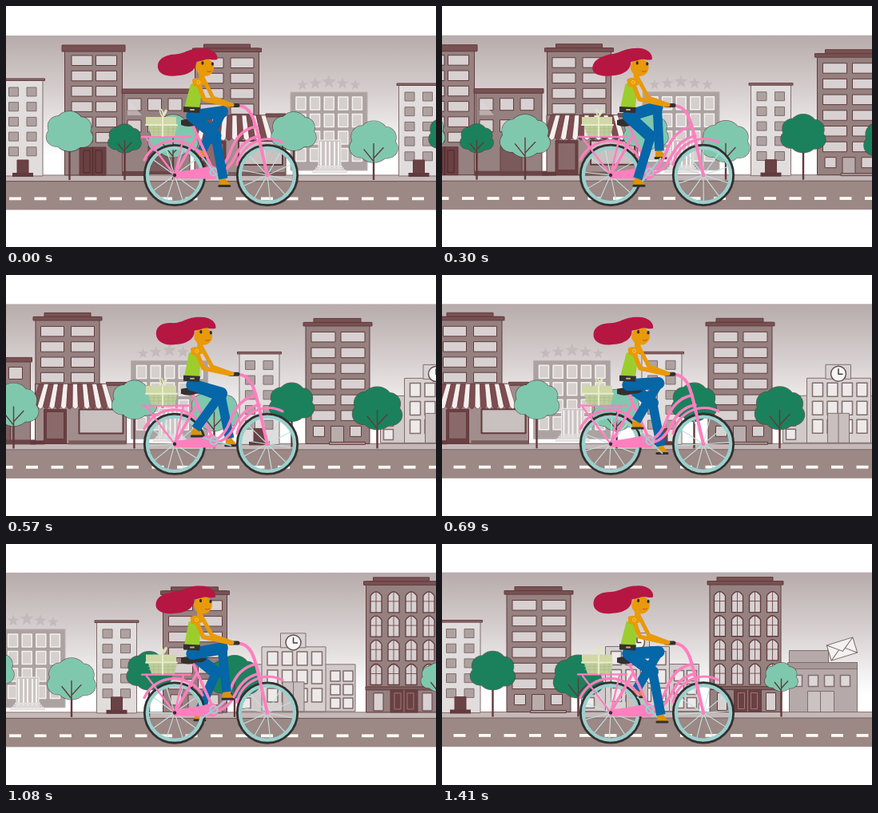
Recreate the animation shown at these times as an HTML page with a canvas. Size 538 by 302 pixels, loop 1.44 s.

```html
<!DOCTYPE html>
<html lang="en">
<head>
<meta charset="utf-8">
<style>
html, body { margin: 0; width: 100%; height: 100%; overflow: hidden; background: #fff; }
canvas { display: block; width: 538px; height: 302px; }
</style>
</head>
<body>
<canvas id="stage" width="538" height="302"></canvas>
<script>
const ctx = document.getElementById('stage').getContext('2d');
const LOOP = 1440, STEP = 30, SPEED = 0.35, TAU = Math.PI * 2;
const INK = '#633a3d', WALL = '#958180', ROOF = '#785153', GLASS = '#d8d1d1', PALE = '#e2dddd', GREY = '#7f6e6e';
const TEAL = '#7fc8ae', GREEN = '#1a815c', PINK = '#ff7fbe', SKIN = '#e89a0a', JEANS = '#0566a8', DARK = '#33302f', RIM = '#9bd0cd';

function rect(x, y, w, h, fill, line, width = 1) {
  if (fill) { ctx.fillStyle = fill; ctx.fillRect(x, y, w, h); }
  if (line) { ctx.strokeStyle = line; ctx.lineWidth = width; ctx.strokeRect(x, y, w, h); }
}
function path(d, fill, line, width = 1) {
  const p = d instanceof Path2D ? d : new Path2D(d);
  if (fill) { ctx.fillStyle = fill; ctx.fill(p); }
  if (line) { ctx.strokeStyle = line; ctx.lineWidth = width; ctx.stroke(p); }
}
function oval(x, y, rx, ry, fill, line, width) {
  const p = new Path2D();
  p.ellipse(x, y, rx, ry, 0, 0, TAU);
  path(p, fill, line, width);
}
function grid(x, y, cols, rows, dx, dy, draw) {
  for (let r = 0; r < rows; r++) for (let c = 0; c < cols; c++) draw(x + c * dx, y + r * dy);
}
const pane = (w, h, fill = GLASS, line = INK, width = 1) => (x, y) => rect(x, y, w, h, fill, line, width);

// Buildings

function block(x, y, w, capX, capW) {
  rect(x + 3, y, w - 6, 212 - y, WALL, INK);
  rect(x + capX, y - 5, capW, 5, ROOF, INK);
  rect(x, y, w, 4.5, ROOF, INK);
}
function whiteHouse(x, y) {
  rect(x, y, 50, 213 - y, PALE, GREY);
  rect(x - 2.5, y - 2, 55, 2.5, '#8d6d6e', INK);
  grid(x + 7.5, y + 9, 2, 5, 22.5, 18.7, pane(12, 11, '#aea2a1', GREY));
  rect(x + 18, 193, 14, 18, '#6a4245', INK);
  rect(x + 12, 209, 26, 5, INK);
}
function brownOne() {
  rect(73.5, 56, 72, 156, WALL, INK);
  rect(70, 49, 79, 8, ROOF, INK);
  grid(82, 62, 2, 6, 30.5, 19.3, pane(26, 12.5));
  rect(92, 177, 33, 35, '#6a4043', INK);
  path('M108.5 177V212M97 181h8v28h-8zM112 181h8v28h-8z', null, '#4e282c');
}
function brownLow() {
  rect(147, 109, 83, 103, WALL, INK);
  rect(145, 104, 87, 5.5, ROOF, INK);
  grid(152, 116, 3, 2, 25.5, 27, pane(17, 15));
  path('M152 116L170 137H152Z', 'rgba(225,218,218,.5)');
  rect(178, 176, 27, 36, '#7b5a5b', INK);
  rect(145, 207, 92, 6, '#6a4547');
}
function shop() {
  block(233.5, 53, 86, 14, 58);
  grid(243, 65, 2, 4, 38, 19.3, pane(29, 12.5));
  rect(236, 137, 114, 75, '#a18e8c', INK);
  rect(325, 135, 25, 4, ROOF, INK);
  rect(247, 169, 28, 43, '#6a4043', INK);
  rect(250, 172, 22, 34, '#8a696b', INK);
  rect(291, 169, 55, 30, '#c9c0c0', INK, 2);
  for (let i = 0; i < 14; i++) {
    const top = 241 + i * 6, bottom = 231.5 + i * 7.3;
    path(`M${top} 137h6L${bottom + 7.3} 165q-3.6 7-7.3 0Z`, i % 2 ? '#f4efed' : '#7c4d51', INK, .6);
  }
  rect(230, 208, 18, 5, INK);
  rect(278, 208, 72, 5, '#7a5c5c');
}
function star(x, y, r) {
  let d = '';
  for (let i = 0; i < 10; i++) {
    const a = i * TAU / 10 - TAU / 4, s = i % 2 ? r * 0.42 : r;
    d += `${i ? 'L' : 'M'}${x + s * Math.cos(a)} ${y + s * Math.sin(a)}`;
  }
  path(d + 'Z', '#c3baba');
}
function hotel() {
  rect(356, 108, 96, 98, '#aca2a1', '#b9b0af');
  grid(363, 114, 5, 4, 17.6, 21.5, pane(12, 16, '#d5cfce', '#f4f1f0', 1.5));
  rect(391, 168, 28, 38, '#cbc4c3', '#f0edec');
  path('M394 170v34M400 170v34M405 170v34M411 170v34M416 170v34', null, '#f5f3f2', 2);
  for (let i = 0; i < 4; i++) rect(389 - i * 2, 200 + i * 2.5, 32 + i * 4, 2, '#e2dedd');
  [371, 387, 404, 421, 437].forEach((x, i) => star(x, 95 + Math.abs(i - 2) * 2, 9 - Math.abs(i - 2)));
}
function brownThree() {
  block(571.5, 60, 86, 13, 59);
  grid(581.5, 72, 2, 6, 37, 19.7, pane(30, 12.5));
  grid(584, 190, 2, 1, 46, 0, pane(14, 13));
  rect(606, 190, 16, 22, '#b8adac', INK);
  rect(604, 210, 45, 3, '#a79897', INK);
}
function school() {
  const small = pane(12, 13, '#eeeaea', GREY, 1.5);
  rect(668, 152, 147, 59, '#d2caca', GREY);
  grid(672, 160, 1, 3, 17, 17, small);
  grid(784, 160, 2, 3, 16, 17, small);
  rect(698, 130, 80, 81, '#d8d1d0', GREY);
  rect(721.5, 113, 31.5, 18, '#d8d1d0', GREY);
  grid(705, 136, 4, 3, 18.5, 23, pane(13, 17, '#eeeaea', GREY, 1.5));
  rect(724, 174, 27, 37, '#c8bfbe', GREY);
  path('M737.5 174V211', null, GREY);
  oval(737.5, 124.5, 9.5, 9.5, '#f7f5f5', '#625555', 1.5);
  path('M737.5 118V125H743', null, '#4b3c3d', 1.5);
}
function archHouse() {
  block(825.5, 48, 95, 12, 70);
  grid(834, 61, 4, 4, 22, 30.2, (x, y) => {
    path(`M${x} ${y + 26}V${y + 5}q7-10 14 0V${y + 26}Z`, GLASS, INK, 1.3);
    path(`M${x + 7} ${y}V${y + 26}M${x} ${y + 12}h14`, null, INK, .8);
  });
  rect(828, 180, 90, 4, '#785e5d', INK);
  rect(859, 184, 34, 28, '#6a4043', INK);
  path('M876 184V212M864 188h8v20h-8zM880 188h8v20h-8z', null, '#9a7b7b');
  grid(838, 188, 2, 1, 61, 0, pane(12, 22));
}
function postOffice() {
  rect(928, 135, 49, 18, '#b5aaa9', GREY);
  rect(928, 150, 85, 62, '#b5aaa9', GREY);
  rect(926, 150, 87, 8, '#a69998', GREY);
  grid(932, 166, 4, 1, 20, 0, pane(12, 14, '#ddd8d7', GREY, 1.5));
  rect(951, 186, 33, 26, '#cbc3c2', GREY);
  path('M967 186V212', null, GREY);
  ctx.save();
  ctx.translate(994, 133);
  ctx.rotate(-0.3);
  rect(-17, -10, 34, 20, '#f4f2f1', '#77696a');
  path('M-17 -10L0 3L17 -10M-17 10L-4 0M17 10L4 0', null, '#77696a');
  ctx.restore();
}

function tree(x, y, r, color, branched) {
  const s = r / 28, crown = new Path2D();
  [[0, -10, 17, 15], [-14, -6, 13, 13], [14, -5, 13, 13], [-16, 7, 13, 12], [16, 8, 13, 12], [0, 10, 18, 15]]
    .forEach(([dx, dy, rx, ry]) => {
      crown.moveTo(x + (dx + rx) * s, y + dy * s);
      crown.ellipse(x + dx * s, y + dy * s, rx * s, ry * s, 0, 0, TAU);
    });
  path(`M${x} ${y + 10}V218`, null, INK, 2.4);
  path(crown, null, 'rgba(70,50,50,.7)', 1.4);
  path(crown, color);
  if (!branched) return;
  path(`M${x} ${y + 42 * s}V${y + 2}M${x} ${y + 24 * s}L${x - 12 * s} ${y + 9 * s}M${x} ${y + 20 * s}L${x + 12 * s} ${y + 7 * s}`, null, INK, 1.4);
}

const sky = ctx.createLinearGradient(0, 37, 0, 205);
sky.addColorStop(0, '#b7abab');
sky.addColorStop(.45, '#d9d2d2');
sky.addColorStop(.9, '#fff');

function street(t) {
  ctx.save();
  ctx.translate(0, -1.5 * t / LOOP);
  rect(0, 37, 538, 218.5, sky);
  rect(0, 212, 538, 8, '#c5b9b8');
  rect(0, 220, 538, 35.5, '#9c8885');
  rect(0, 211.5, 538, 1, '#8a7574');
  rect(0, 219, 538, 1.2, '#745c5c');
  ctx.translate(-SPEED * t, 0);
  for (let x = 4; x < 1060; x += SPEED * LOOP / 16) rect(x, 239.5, 15, 3.8, '#fbfaf4');
  whiteHouse(-4, 93);
  brownOne();
  brownLow();
  shop();
  hotel();
  whiteHouse(491.5, 99);
  brownThree();
  school();
  archHouse();
  postOffice();
  tree(79.5, 157, 28, TEAL);
  tree(148.5, 166, 20, GREEN, true);
  tree(209, 163, 30, TEAL, true);
  tree(360, 157, 27, TEAL);
  tree(460, 170, 29, TEAL, true);
  tree(557, 160, 27, GREEN);
  tree(664, 167.5, 30, GREEN, true);
  tree(918, 168, 20, TEAL, true);
  ctx.restore();
}

// Bicycle and rider

function wheel(x, turn) {
  for (let i = 0; i < 10; i++) {
    const a = turn + i * TAU / 10;
    path(`M${x} 212L${x + 34 * Math.cos(a)} ${212 + 34 * Math.sin(a)}`, null, '#c2e2e0', 1.1);
  }
  oval(x, 212, 34.5, 34.5, null, RIM, 5);
  oval(x, 212, 37.7, 37.7, null, DARK, 2.8);
}
function leg(angle) {
  const px = 259.5 + 22 * Math.cos(angle), py = 208 + 22 * Math.sin(angle);
  const hip = [233, 138], ankle = [px - 1, py - 9];
  const thigh = 38, shin = 55, dx = ankle[0] - hip[0], dy = ankle[1] - hip[1];
  const reach = Math.min(Math.hypot(dx, dy), thigh + shin);
  const lift = Math.acos((thigh ** 2 + reach ** 2 - shin ** 2) / (2 * thigh * reach));
  const a = Math.atan2(dy, dx) - lift;
  const knee = [hip[0] + thigh * Math.cos(a), hip[1] + thigh * Math.sin(a)];
  path(`M${ankle}L${px - 1} ${py - 3}`, null, SKIN, 7);
  path(`M${px - 6} ${py - 8}h8q5 4 5 7h-13z`, '#de9206');
  path(`M${px - 6} ${py}h13`, null, DARK, 3);
  path(`M${hip}L${knee}`, null, JEANS, 15);
  ctx.lineCap = 'butt';
  path(`M${knee}L${ankle}`, null, JEANS, 11.5);
  ctx.lineCap = 'round';
}
function basket() {
  path('M175 139h38v11h-38z', '#cfd8a6');
  path('M178 150h36l-3 13h-29z', '#bfcd9b');
  path('M178 154h34M179 158h33M185 150v12M191 150v12M203 150v12M209 150v12', null, '#adbd8b', .7);
  path('M196 139v24M175 149h39', null, '#e8edcb', 2);
  path('M196 139C188 127 196 126 197 137C200 126 204 130 196 139', null, '#e0e6c2', 1.6);
}
function bicycle(t, crank) {
  const turn = t * TAU / 720;
  wheel(211, turn);
  wheel(327, turn + .2);
  path('M173 193A41 41 0 0 1 246 190M289 199A40 40 0 0 1 346 171', null, PINK, 3.2);
  path('M170 164H231M176 166L211 212M222 165L211 212', null, PINK, 2.3);
  basket();
  path('M233 148L260 208M238 164L211 212', null, PINK, 3.5);
  path('M313 151C296 154 286 168 281 182S270 203 262 207M317 163C300 166 292 178 286 190S272 208 264 210', null, PINK, 3.5);
  path('M291 125C307 126 311 144 315 160L327 212', null, PINK, 4);
  path('M280 124.5H290', null, DARK, 5);
  path('M210 208Q240 205 257 200A9 9 0 0 1 261 217Q235 216 210 216Z', PINK);
  oval(211, 212, 2.2, 2.2, DARK);
  oval(327, 212, 2.5, 2.5, PINK);
  oval(260, 208, 4.5, 4.5, null, RIM, 2);
  const cx = 22 * Math.cos(crank), cy = 22 * Math.sin(crank);
  path(`M${260 - cx} ${208 - cy}L${260 + cx} ${208 + cy}`, null, RIM, 2);
  path('M219 143Q234 139 251 144Q250 149 238 149Q228 153 219 149Z', DARK);
}
function upperBody(t) {
  const sway = 1.7 * Math.cos((t - 90) * TAU / 720) - 1.3;
  const droop = 3 + 3 * Math.cos((t - 200) * TAU / 720);
  path(`M${247 + sway} 91L${259 + sway * .5} 115L283 124`, null, SKIN, 5);
  path(`M223 128L${231 + sway} 98Q${240 + sway} 94 ${246 + sway} 102L242 128Z`, '#9bce2d');
  path('M222 126L243 127L242 134L222 133Z', DARK);
  path('M231 130h4', null, '#c9b27a', 2);
  ctx.save();
  ctx.translate(sway, 0);
  path('M245 84V96', null, SKIN, 7);
  path('M233 92Q240 88 247 93L244 103L234 100Z', SKIN);
  oval(249, 77, 11.3, 11, SKIN);
  oval(246, 71.5, 1.6, 2.2, DARK);
  oval(258.5, 72.5, 1.6, 2.2, DARK);
  path('M252 82q3 1.5 5-.5', null, '#b9542a', 1);
  path(`M190 ${72 + droop}C191 ${62 + droop} 202 ${59 + droop * .8} 212 60.5C224 60 228 53 244 53C258 52 266 60 264.5 67C258 69 254 65 247 68L238 70C238 82 226 87 212 87.5C198 89 189 ${82 + droop * .5} 190 ${72 + droop}Z`, '#b61642');
  ctx.restore();
  path(`M${240 + sway} 96L${248 + sway * .5} 117L280 124`, null, SKIN, 5.5);
  oval(241 + sway, 95.5, 2, 2, null, '#f5cf3d', 1);
}
function draw(t) {
  const crank = 53 * Math.PI / 180 + t / LOOP * TAU;
  rect(0, 0, 538, 302, '#fff');
  ctx.lineCap = 'butt';
  ctx.lineJoin = 'round';
  street(t);
  ctx.save();
  ctx.translate(0, -.6 * t / LOOP);
  ctx.lineCap = 'round';
  leg(crank + Math.PI);
  bicycle(t, crank);
  leg(crank);
  upperBody(t);
  ctx.restore();
}

function play(now) {
  draw(Math.floor(now % LOOP / STEP) * STEP);
  requestAnimationFrame(play);
}
draw(0);
requestAnimationFrame(play);
</script>
</body>
</html>
```
